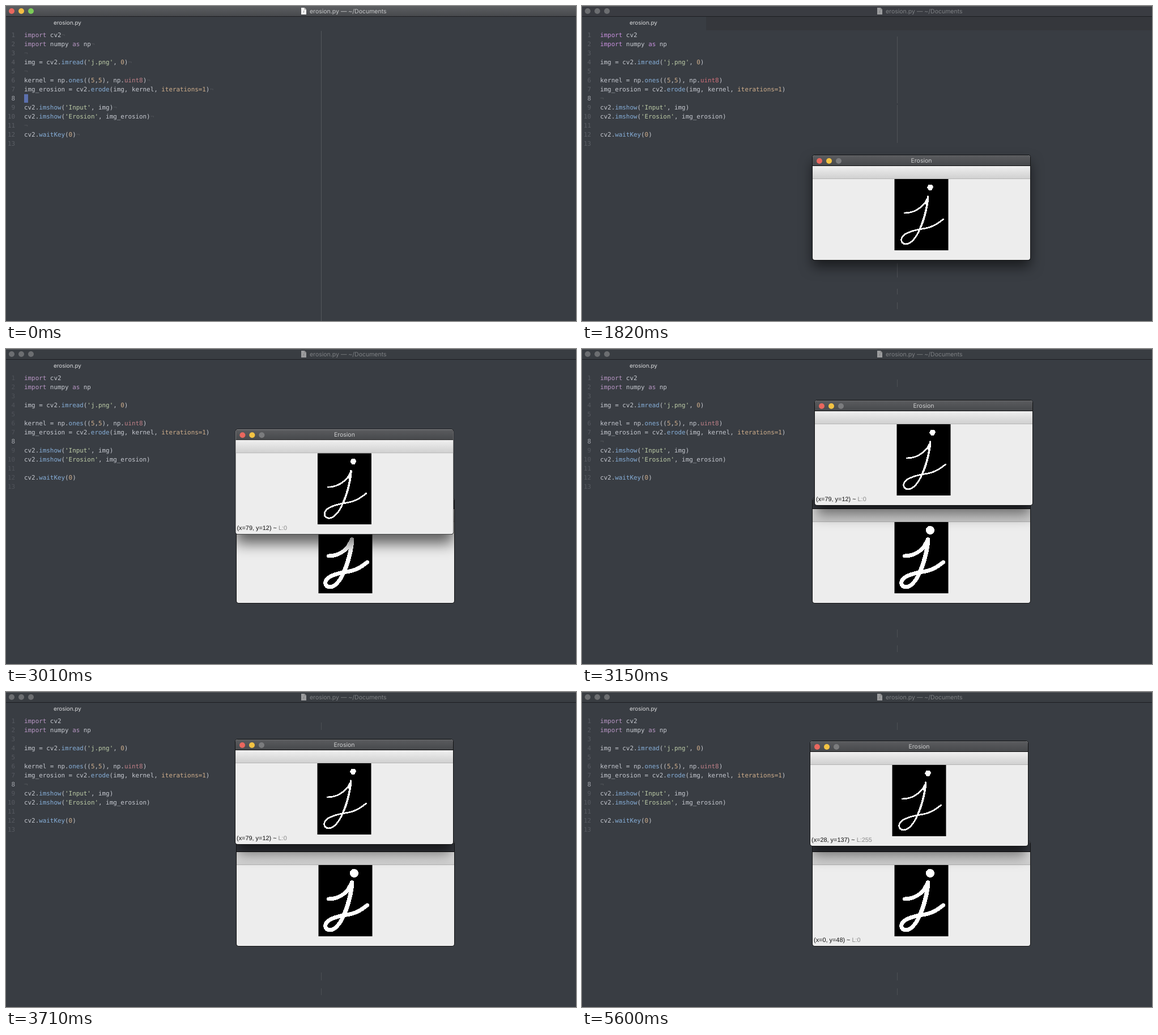
Animation of 1006x557 px, one loop 5.74 s. Source, as an HTML page:

```html
<!DOCTYPE html>
<html lang="en">
<head>
<meta charset="utf-8">
<title>erosion.py</title>
<style>
html, body { margin: 0; width: 100%; height: 100%; overflow: hidden; background: #393d43; }
body { position: relative; text-rendering: geometricPrecision; animation: phase 5740ms step-end infinite; }
body * { box-sizing: border-box; }

/* Editor focus, palette and guide line by phase */
@keyframes phase {
  0% {
    --bar: linear-gradient(#5d5f62, #47494d); --title: #c6c7c9; --page: #f4f4f4;
    --red: #e9675e; --yellow: #f3be43; --green: #7bcb58;
    --num: #5b5e65; --mark: #505359; --mark8: transparent; --strip: transparent;
    --kw: #b896c4; --type: #c08088;
    --guide: linear-gradient(transparent 44px, #54575c 0);
  }
  21.951% {
    --bar: linear-gradient(#5c5e61 1px, #393d42 0); --title: #7e8084; --page: #9b9c9e;
    --red: #6c6e71; --yellow: #6c6e71; --green: #6c6e71;
    --num: #50535a; --mark: transparent; --mark8: transparent; --strip: transparent;
    --kw: #b896c4; --type: #c08088; --guide: none;
  }
  26.829% {
    --bar: linear-gradient(#5c5e61 1px, #3a3c42 0); --title: #7e8084; --page: #9b9c9e;
    --red: #6c6e71; --yellow: #6c6e71; --green: #6c6e71;
    --num: #5b5e65; --mark: transparent; --mark8: #55585d; --strip: #35373c;
    --kw: #c68fdc; --type: #d0707a;
    --guide: linear-gradient(transparent 54px, #505358 0 172px, transparent 0 175px, #505358 0 242px,
      transparent 0 455px, #505358 0 480px, transparent 0 500px, #505358 0 510px,
      transparent 0 524px, #505358 0 536px, transparent 0);
  }
  43.902% {
    --bar: linear-gradient(#5c5e61 1px, #393d42 0); --title: #7e8084; --page: #9b9c9e;
    --red: #6c6e71; --yellow: #6c6e71; --green: #6c6e71;
    --num: #50535a; --mark: transparent; --mark8: transparent; --strip: transparent;
    --kw: #b896c4; --type: #c08088; --guide: none;
  }
  54.878%, 100% {
    --bar: linear-gradient(#5c5e61 1px, #393d42 0); --title: #7e8084; --page: #9b9c9e;
    --red: #6c6e71; --yellow: #6c6e71; --green: #6c6e71;
    --num: #565960; --mark: transparent; --mark8: #55585d; --strip: transparent;
    --kw: #b896c4; --type: #c08088;
    --guide: linear-gradient(transparent 54px, #4c4f54 0 67px, transparent 0 496px,
      #4c4f54 0 510px, transparent 0 524px, #4c4f54 0 536px, transparent 0);
  }
}

.editor, .editor > *, .win, .win > * { position: absolute; }
.editor { inset: 0; }
.bar { left: 0; top: 0; width: 100%; height: 19px; background: var(--bar); border-bottom: 1px solid #1d1e21; }
.title, .tab { font: 10.5px/19px Inter, sans-serif; white-space: pre; }
.title { left: 536px; top: 0; color: var(--title); }
.page { left: 521px; top: 3px; }
.light { width: 10px; height: 10px; border-radius: 50%; }
.strip { left: 219px; right: 0; top: 19px; height: 24px; background: var(--strip); }
.tab { left: 84px; top: 21px; font-size: 9.9px; color: #dcdddf; }
.guide { left: 556px; top: 0; width: 1px; height: 557px; background: var(--guide); }

.code { left: 32px; top: 44px; margin: 0; color: #c5c8cf;
  font: 10.88px/16px "DejaVu Sans Mono", monospace; counter-reset: n; }
.code div { height: 16px; position: relative; }
.code div::before { counter-increment: n; content: counter(n); position: absolute;
  left: -32px; width: 16px; text-align: right; color: var(--num); }
.code div::after { content: "¬"; color: var(--mark); }
.code div:nth-child(8)::before { color: #a4a7ad; }
.code div:nth-child(8)::after { color: var(--mark8); }
.code div:last-child::after { content: none; }
.k { color: var(--kw); }
.f { color: #86aed8; }
.s { color: #bccba6; }
.n { color: #cfae8b; }
.t { color: var(--type); }
.cursor { left: 32px; top: 156px; width: 7px; height: 15px; background: #5c70ae;
  animation: blink 5740ms step-end infinite; }
@keyframes blink {
  0%, 14.634% { opacity: 1; }
  7.317%, 21.951%, 100% { opacity: 0; }
}

.windows { animation: open 5740ms step-end infinite; }
@keyframes open { 0% { visibility: hidden; } 26.829%, 100% { visibility: visible; } }
.win, .glow { position: absolute; left: 407px; top: 264px; width: 384px; height: 185px; border-radius: 4px; }
.win { background: #ededed; overflow: hidden; box-shadow: 0 0 0 1px #111213; }
.win .bar { background: linear-gradient(#67696c 1px, #5a5b5e 0, #47494c); border-color: #0d0d0e; }
.win .tool { left: 0; top: 19px; width: 100%; height: 23px; border-bottom: 1px solid #b5b5b5;
  background: linear-gradient(#f0f0f0, #d0d0d0); }
.win .title { left: 0; width: 100%; text-align: center; color: #cfd0d1; }
.win svg { left: 144px; top: 42px; }
.status { left: 2px; top: 168px; font: 10.9px/14px "Liberation Sans", Arial, sans-serif;
  white-space: pre; color: #111; }
.status span { color: #8a8a8a; }
.back .bar { background: #393c43; }
.shade { inset: 0; border-radius: 4px; box-shadow: 0 17px 24px rgba(0,0,0,.6); }
.front, .shade { animation: drag 5740ms linear infinite; }
.glow { box-shadow: 0 12px 22px rgba(0,0,0,.55); animation: glow 5740ms step-end infinite; }
@keyframes glow { 0% { opacity: 1; } 43.902%, 100% { opacity: 0; } }
@keyframes drag {
  0%, 43.902% { transform: translate(0, 0); animation-timing-function: steps(4); }
  48.780% { transform: translate(-10px, -45px); animation-timing-function: steps(5); }
  54.878% { transform: translate(4px, -173px); animation-timing-function: steps(2); }
  57.317% { transform: translate(6px, -179px); animation-timing-function: steps(6); }
  64.634% { transform: translate(-2px, -180px); animation-timing-function: steps(1); }
  65.854%, 100% { transform: translate(-4px, -177px); }
}
.glyph { fill: none; stroke: #fff; stroke-linecap: round; stroke-linejoin: round; shape-rendering: crispEdges; }
</style>
</head>
<body>
<svg width="0" height="0" style="position:absolute">
  <defs>
    <rect id="photo" x=".5" width="95" height="126"/>
    <path id="stem" d="M58 31C58 42 53 68 44 88"/>
    <path id="loop" d="M44 88C38 103 28 115 19 115C9 114 9 104 17 98C28 91 38 90 48 88C64 86 74 80 85 71"/>
    <path id="arm" d="M17 60C32 60 46 52 56 38"/>
  </defs>
</svg>

<div class="editor">
  <div class="bar"></div>
  <div class="light" style="left:5px;top:4px;background:var(--red)"></div>
  <div class="light" style="left:22px;top:4px;background:var(--yellow)"></div>
  <div class="light" style="left:38.5px;top:4px;background:var(--green)"></div>
  <svg class="page" width="10" height="13">
    <path d="M0 0H6L9 3V12H0Z" style="fill:var(--page)"/>
    <path d="M6 0V3H9M5 5L4 9" fill="none" stroke="#777" stroke-width=".8"/>
  </svg>
  <div class="title">erosion.py — ~/Documents</div>
  <div class="strip"></div>
  <div class="tab">erosion.py</div>
  <div class="guide"></div>
  <pre class="code"><div><span class="k">import</span> cv2</div><div><span class="k">import</span> numpy <span class="k">as</span> np</div><div></div><div>img = cv2.<span class="f">imread</span>(<span class="s">'j.png'</span>, <span class="n">0</span>)</div><div></div><div>kernel = np.<span class="f">ones</span>((<span class="n">5</span>,<span class="n">5</span>), np.<span class="t">uint8</span>)</div><div>img_erosion = cv2.<span class="f">erode</span>(img, kernel, <span class="n">iterations=1</span>)</div><div></div><div>cv2.<span class="f">imshow</span>(<span class="s">'Input'</span>, img)</div><div>cv2.<span class="f">imshow</span>(<span class="s">'Erosion'</span>, img_erosion)</div><div></div><div>cv2.<span class="f">waitKey</span>(<span class="n">0</span>)</div><div></div></pre>
  <div class="cursor"></div>
</div>

<div class="windows">
  <div class="glow"></div>
  <div class="win back">
    <div class="bar"></div>
    <div class="tool"></div>
    <svg width="96" height="126">
      <use href="#photo"/>
      <g class="glyph" stroke-width="7" transform="translate(1.5 0)">
        <use href="#stem" stroke-width="7.6"/><use href="#loop"/><use href="#arm"/>
        <path d="M58 31L56 44L52 42Z"/>
        <circle cx="62" cy="14.5" r="7.6" fill="#fff" stroke="none"/>
      </g>
    </svg>
    <div class="status" id="backStatus"></div>
    <div class="shade"></div>
  </div>
  <div class="win front">
    <div class="bar"></div>
    <div class="light" style="left:7px;top:5px;background:#e9675e"></div>
    <div class="light" style="left:24px;top:5px;background:#f3c343"></div>
    <div class="light" style="left:41px;top:5px;background:#7b7c7e"></div>
    <div class="title">Erosion</div>
    <div class="tool"></div>
    <svg width="96" height="126">
      <use href="#photo"/>
      <g class="glyph" stroke-width="2.8" transform="translate(1.5 0)">
        <use href="#stem" stroke-width="3.6"/><use href="#loop"/><use href="#arm"/>
        <path d="M58.5 30L56 46L52 42Z" fill="#fff" stroke-width="1"/>
        <path d="M59 9.5H65L67.5 14L65 19.5H59.5L56.5 15Z" fill="#fff" stroke="none"/>
      </g>
    </svg>
    <div class="status" id="frontStatus"></div>
  </div>
</div>

<script>
const LOOP = 5740, STEP = 70;
const front = document.getElementById('frontStatus');
const back = document.getElementById('backStatus');

// Pointer readout moving from a to b between two times
function readout(t, from, to, a, b, level = 0) {
  const p = Math.min(1, Math.max(0, (t - from) / (to - from)));
  const [x, y] = a.map((v, i) => Math.round(v + (b[i] - v) * p));
  return `(x=${x}, y=${y}) ~ <span>L:${p === 1 ? level : 0}</span>`;
}

function show(el, html) {
  if (el.shown !== html) el.innerHTML = el.shown = html;
}

let start;
function draw(now) {
  start ??= now;
  const t = Math.floor((now - start) % LOOP / STEP) * STEP;
  show(front, t < 2310 ? '' :
    t < 4200 ? readout(t, 2310, 2450, [60, 40], [79, 12]) :
    readout(t, 4200, 4620, [79, 12], [28, 137], 255));
  show(back, t < 4690 ? '' : readout(t, 4690, 5040, [26, 5], [0, 48]));
  requestAnimationFrame(draw);
}
requestAnimationFrame(draw);
</script>
</body>
</html>
```
